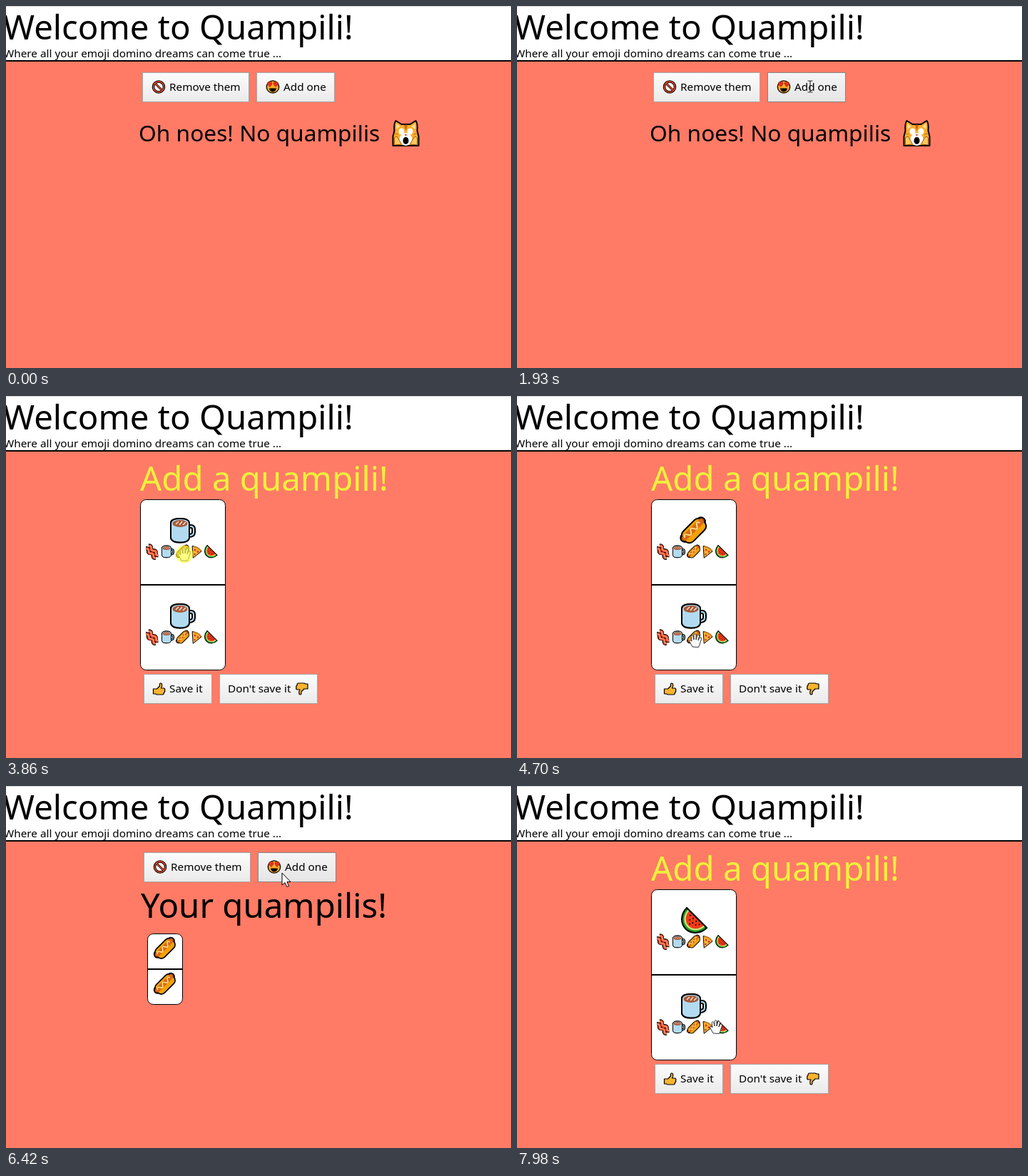
Write an HTML page that moves like this. It is 708x508 px and loops after 8000 ms.

```html
<!DOCTYPE html>
<html lang="en">
<head>
<meta charset="utf-8">
<title>Welcome to Quampili!</title>
<style>
  html, body { margin: 0; width: 100%; height: 100%; overflow: hidden; background: #ff7b66; }
  svg { display: block; }
  text { font: 15.3px "Noto Sans", "Open Sans", sans-serif; }
  .big { font-size: 47.4px; }
  .mid { font-size: 31.7px; }
  .ink { stroke: #000; stroke-width: 2; stroke-linejoin: round; stroke-linecap: round; }
  .button rect { fill: url(#face); stroke: #a5a5a5; }
  .button.hover rect { fill: url(#faceHover); stroke: #858585; }
</style>
</head>
<body>
<svg width="708" height="508" viewBox="0 0 708 508">
  <defs>
    <linearGradient id="face" x2="0" y2="1"><stop stop-color="#fcfcfc"/><stop offset="1" stop-color="#eaeaea"/></linearGradient>
    <linearGradient id="faceHover" x2="0" y2="1"><stop stop-color="#f5f5f5"/><stop offset="1" stop-color="#e5e5e5"/></linearGradient>

    <!-- Food icons share a 36-unit box centred on the origin. -->
    <g id="mug">
      <path d="M8-6H11Q15-6 15-2V2Q15 7 8 7" fill="none" stroke="#000" stroke-width="6"/>
      <path d="M8-6H11Q15-6 15-2V2Q15 7 8 7" fill="none" stroke="#b2dbf1" stroke-width="2"/>
      <path class="ink" d="M-17-11V10Q-16 16-4 16.500Q8 16 9-10Q9-17-4-17T-17-11Z" fill="#b2dbf1"/>
      <path class="ink" d="M-17-11V10Q-16 16.500-4 16.500T9 10V-11Q8-17-4-17T-17-11Z" fill="#b2dbf1"/>
      <ellipse cx="-4" cy="-10" rx="10.500" ry="5" fill="#a65a3a"/>
      <path d="M-10-9l4-4M-5-8l4-5M0-8l4-4" stroke="#f5dfc8" stroke-width="1.500"/>
    </g>
    <g id="hotdog" transform="rotate(-45)">
      <rect class="ink" x="-22" y="-8" width="44" height="12" rx="6" fill="#c4511c"/>
      <rect class="ink" x="-19" y="-10" width="38" height="20" rx="8" fill="#f2a300"/>
      <rect x="-20" y="-6" width="40" height="8" rx="4" fill="#d9691a"/>
      <path d="M-16-2q3-6 6 0t6 0t6 0t6 0t6 0" fill="none" stroke="#ffe08a" stroke-width="2"/>
    </g>
    <g id="bacon" transform="rotate(45)">
      <path d="M-20-5q5-6 10 0t10 0t10 0t10 0M-20 6q5-6 10 0t10 0t10 0t10 0" fill="none" stroke="#000" stroke-width="12"/>
      <path d="M-19-5q5-6 10 0t10 0t10 0t8 0M-19 6q5-6 10 0t10 0t10 0t8 0" fill="none" stroke="#f0512e" stroke-width="8"/>
      <path d="M-19-5q5-6 10 0t10 0t10 0t8 0M-19 6q5-6 10 0t10 0t10 0t8 0" fill="none" stroke="#ffac8c" stroke-width="2"/>
    </g>
    <g id="pizza">
      <path class="ink" d="M-11-16Q8-13 14-1L-9 17Z" fill="#f9b63b"/>
      <path d="M-9-14Q7-11 12-2" fill="none" stroke="#d9851d" stroke-width="4"/>
      <g fill="#d53a1d"><circle cx="-4" cy="-5" r="3"/><circle cx="4" cy="0" r="3"/><circle cx="-5" cy="7" r="2.500"/></g>
    </g>
    <path id="wedge" d="M-19.800 0A19.800 22 0 0 0 19.800 0Z"/>
    <g id="melon" transform="translate(4 -4) rotate(45)">
      <use href="#wedge" class="ink" fill="#219b24"/>
      <use href="#wedge" transform="scale(.84)" fill="#c9e77b"/>
      <use href="#wedge" transform="scale(.73)" fill="#f23a18"/>
      <path d="M-19.800 0H19.800" class="ink"/>
      <path d="M-9 4h0M-3 4h0M3 4h0M9 4h0M-5 9h0M1 9h0M6 8h0M-1 13h0" class="ink"/>
    </g>

    <g id="ban" fill="none">
      <circle r="7.500" fill="#fff" stroke="#000" stroke-width="3.600"/>
      <path d="M-5-5L5 5" stroke="#000" stroke-width="3"/>
      <g stroke="#ee4a2c" stroke-width="1.600"><circle r="7.500"/><path d="M-5-5L5 5"/></g>
    </g>
    <g id="love">
      <circle r="8.700" fill="#f9a928" stroke="#000" stroke-width="1.300"/>
      <path d="M-5 2H5Q4 7 0 7T-5 2Z"/>
      <path d="M-4 0Q-9-4-7-6.500Q-5-8-4-6Q-2-8-1-6Q0-4-4 0ZM4 0Q0-4 1-6Q2-8 4-6Q5-8 7-6.500Q9-4 4 0Z" fill="#e8301c" stroke="#8a2010" stroke-width=".5"/>
    </g>
    <g id="cat">
      <path class="ink" stroke-width="2.500" d="M-14-18L-6-13H6L14-18Q17-14 16-4L18 4V17H-18V4L-16-4Q-17-14-14-18Z" fill="#f8ac2d"/>
      <path d="M-13-14L-8-10L-13-6ZM13-14L8-10L13-6Z" fill="#ffe0a0"/>
      <path d="M-2-12h4l-2 7ZM-16 0l5 1M16 0l-5 1" fill="#c76b12" stroke="#c76b12"/>
      <g fill="#fff">
        <ellipse cx="-6" cy="-3" rx="4" ry="4.500"/><ellipse cx="6" cy="-3" rx="4" ry="4.500"/>
        <ellipse cy="8" rx="9" ry="9"/>
      </g>
      <path d="M-2 1h4l-2 3Z" fill="#e75c38"/>
      <ellipse cy="10" rx="4" ry="5"/>
      <path d="M-16 16V6Q-12 2-10 8L-6 15ZM16 16V6Q12 2 10 8L6 15Z" fill="#ffc95c" stroke="#9a5b0a"/>
    </g>
    <path id="thumb" d="M-8 0H-3L1-4V-7Q2-9 4-7Q5-4 3-1H7Q9 0 8 2Q9 4 7 5Q7 8 5 8H-3L-5 7H-8Z" fill="#f9b42d" stroke="#000" stroke-width="1.200" stroke-linejoin="round"/>
  </defs>

  <rect width="708" height="508" fill="#ff7b66"/>
  <rect width="708" height="76" fill="#fff"/>
  <path d="M0 .5H708" stroke="#d5d5d5"/>
  <path d="M0 77H708" stroke="#000" stroke-width="2"/>
  <text class="big" x="-4" y="46.500">Welcome to Quampili!</text>
  <text x="-3" y="72">Where all your emoji domino dreams can come true ...</text>

  <g id="toolbar">
    <g class="button"><rect x="191.500" y="93.500" width="149" height="41"/><use href="#ban" x="214" y="113.500"/><text x="229" y="119">Remove them</text></g>
    <g class="button" id="add"><rect x="351.500" y="93.500" width="109" height="41"/><use href="#love" x="374" y="113.500"/><text x="389" y="119">Add one</text></g>
  </g>
  <g id="empty">
    <text class="mid" x="186" y="190">Oh noes! No quampilis</text>
    <use href="#cat" x="560.500" y="179"/>
  </g>
  <g id="list">
    <text class="big" x="189" y="185">Your quampilis!</text>
    <rect x="198.500" y="207.500" width="49" height="99" rx="8" fill="#fff" stroke="#000"/>
    <path d="M198 257H248" stroke="#000" stroke-width="2"/>
    <use href="#hotdog" transform="translate(223 228) scale(.82)"/>
    <use href="#hotdog" transform="translate(223 278) scale(.82)"/>
  </g>
  <g id="edit">
    <text class="big" x="188" y="133" fill="#edf13c">Add a quampili!</text>
    <rect x="188.500" y="145.500" width="119" height="239" rx="8" fill="#fff" stroke="#000"/>
    <path d="M188 265H308" stroke="#000" stroke-width="2"/>
    <g id="choices">
      <use href="#bacon" transform="translate(205 218.500) scale(.47)"/>
      <use href="#mug" transform="translate(227 218.500) scale(.5)"/>
      <use href="#hotdog" transform="translate(248 218.500) scale(.5)"/>
      <use href="#pizza" transform="translate(267 218.500) scale(.5)"/>
      <use href="#melon" transform="translate(287 218.500) scale(.5)"/>
    </g>
    <use href="#choices" y="120"/>
    <use id="topPick" x="248" y="189"/>
    <use id="bottomPick" x="248" y="309"/>
    <g class="button" id="save"><rect x="193.500" y="390.500" width="95" height="41"/><use href="#thumb" x="214.500" y="411"/><text x="229" y="416">Save it</text></g>
    <g class="button"><rect x="299.500" y="390.500" width="137" height="41"/><text x="311" y="416">Don't save it</text><use href="#thumb" transform="translate(415 411) scale(-1)"/></g>
  </g>

  <g id="cursor">
    <path id="arrow" d="M0 0V17L4 13.500L7 19.500L9.500 18.500L7 12.500H12Z" fill="#fff" stroke="#000" stroke-width="1"/>
    <path id="beam" d="M-3.500-8H-1L0-7L1-8H3.500M0-7V7M-3.500 8H-1L0 7L1 8H3.500" fill="none" stroke="#333" stroke-width="1.200"/>
    <path id="hand" d="M-4 9L-8.500 1Q-8-2-5 1L-6-6Q-4-9-3-5L-2-1V-8Q0-11 1-8V-1L3-8Q5-9 5.500-6L4 0L6-4Q9-5 8.500-2L6 6L4.500 9.500Z" fill="#fff" stroke="#222" stroke-width=".9" stroke-linejoin="round"/>
  </g>
  <circle id="halo" r="12.500" fill="#ffff38" opacity=".62"/>
</svg>
<script>
  const LOOP = 8000;
  const el = id => document.getElementById(id);
  const show = (id, on) => el(id).setAttribute('visibility', on ? 'visible' : 'hidden');

  // Time, x, y, pointer shape (kept until the next one named).
  const path = [
    [460, 567, 476, 'arrow'], [700, 470, 260], [850, 425, 135], [930, 421, 114, 'beam'],
    [1000, 420, 112], [1230, 420, 110], [1310, 417, 114], [1540, 417, 113], [1700, 411, 113],
    [2310, 411, 113], [2400, 380, 125], [2500, 310, 170, 'arrow'], [2650, 240, 222, 'hand'],
    [2770, 228, 225], [3230, 228, 225], [3380, 249, 225], [3610, 249, 225], [3690, 250, 222],
    [4000, 250, 222], [4150, 251, 260, 'arrow'], [4470, 252, 353], [4620, 252, 353],
    [4700, 250, 343, 'hand'], [5170, 250, 343], [5250, 250, 370, 'arrow'], [5410, 253, 410],
    [6050, 253, 410], [6200, 300, 300], [6420, 387, 122], [6580, 387, 122],
    [6640, 398, 110, 'beam'], [6690, 403, 95], [6750, 403, 100], [6820, 400, 102],
    [7050, 360, 150, 'arrow'], [7250, 300, 235], [7350, 288, 232, 'hand'], [7450, 287, 219],
    [7670, 287, 219], [7800, 285, 250, 'arrow'], [7910, 281, 325, 'hand'], [7980, 279, 338]
  ];
  const views = [[0, 'empty'], [2000, 'edit'], [5650, 'list'], [6580, 'edit']];
  const topPicks = [[0, 'mug'], [3930, 'hotdog'], [6580, 'mug'], [7600, 'melon']];
  const bottomPicks = [[0, 'mug'], [4930, 'hotdog'], [6580, 'mug']];
  const clicks = [1850, 3860, 4850, 5580, 6500, 7520];

  const latest = (steps, t) => steps.filter(s => s[0] <= t).pop()[1];

  function pointerAt(t) {
    const i = path.findLastIndex(p => p[0] <= t);
    if (i < 0) return { x: -99, y: -99 };
    const a = path[i], b = path[i + 1] || a;
    const k = a === b ? 0 : (t - a[0]) / (b[0] - a[0]);
    return {
      x: Math.round(a[1] + (b[1] - a[1]) * k),
      y: Math.round(a[2] + (b[2] - a[2]) * k),
      shape: path.slice(0, i + 1).findLast(p => p[3])[3]
    };
  }

  function draw(now) {
    const t = now % LOOP, view = latest(views, t), p = pointerAt(t);
    const inside = (x, y, w, h) => p.x >= x && p.x < x + w && p.y >= y && p.y < y + h;
    const shift = view === 'list' ? 2 : 0;

    for (const id of ['empty', 'edit', 'list']) show(id, id === view);
    show('toolbar', view !== 'edit');
    el('toolbar').setAttribute('transform', `translate(${shift})`);
    el('topPick').setAttribute('href', '#' + latest(topPicks, t));
    el('bottomPick').setAttribute('href', '#' + latest(bottomPicks, t));
    el('add').classList.toggle('hover', inside(351 + shift, 93, 110, 42));
    el('save').classList.toggle('hover', inside(193, 390, 96, 42));

    const place = `translate(${p.x} ${p.y})`;
    for (const id of ['arrow', 'beam', 'hand']) show(id, id === p.shape);
    el('cursor').setAttribute('transform', place);
    el('halo').setAttribute('transform', place);
    show('halo', clicks.some(c => t >= c && t < c + 70));
  }

  function frame() {
    draw(performance.now());
    requestAnimationFrame(frame);
  }
  frame();
</script>
</body>
</html>
```
